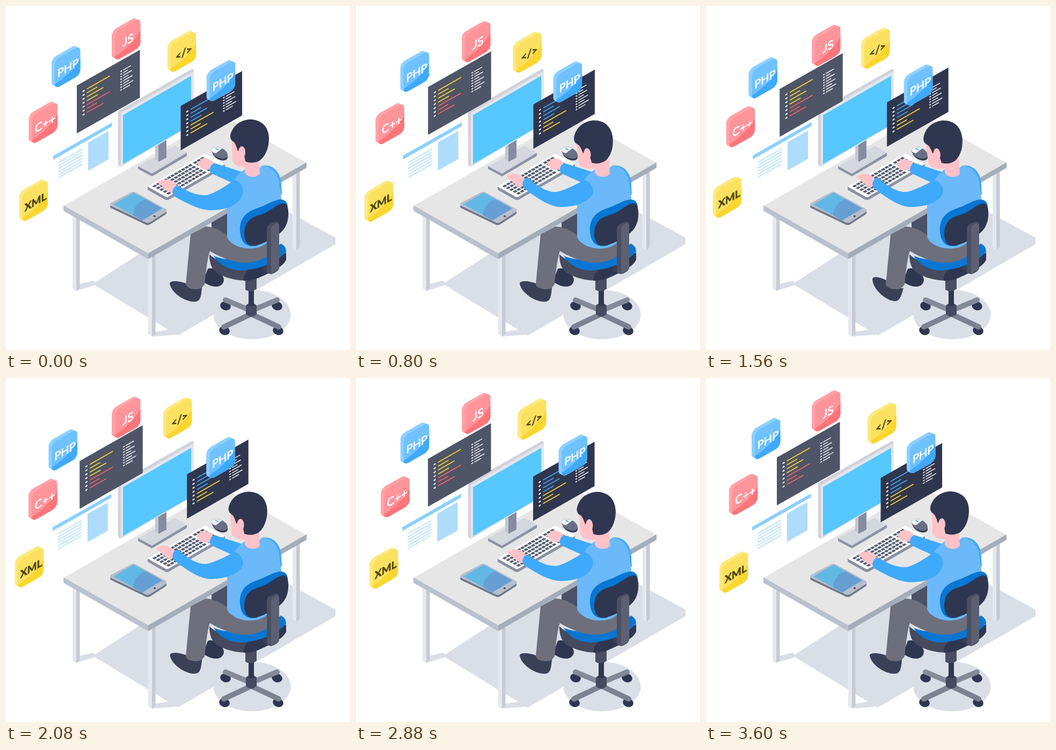
An HTML page with a canvas that plays this animation: 641 px wide and 640 px high, repeating every 3640 ms.

```html
<!DOCTYPE html>
<html lang="en">
<head>
<meta charset="utf-8">
<title>Programmer at a desk</title>
<style>
html, body { margin: 0; width: 100%; height: 100%; overflow: hidden; background: #fff; }
canvas { display: block; width: 641px; height: 640px; }
</style>
</head>
<body>
<canvas id="stage" width="641" height="640"></canvas>
<script>
const ctx = document.getElementById('stage').getContext('2d');
const LOOP = 3640, STEP = 40, SLOPE = -0.567;
const NAVY = '#2f3650', SKIN = '#ffc2c8', SLEEVE = '#3fa9fb', SHADOW = '#dadee7';

// ---- motion ----
const angle = t => 2 * Math.PI * t / LOOP;
const wave = (t, cycles = 1) => (1 - Math.cos(angle(t) * cycles)) / 2;

// Position on an ellipse; dir is 1 for clockwise, -1 for the other way
function orbit(t, cx, cy, rx, ry, phase, dir) {
  const a = angle(t) + phase;
  return [cx + rx * Math.cos(a), cy + dir * ry * Math.sin(a)];
}

function ease(t, from, to) {
  const u = Math.min(1, Math.max(0, (t - from) / (to - from)));
  return u * u * (3 - 2 * u);
}
// Rises from a to b, rests, then falls from c to d
const pulse = (t, a, b, c, d) => ease(t, a, b) - ease(t, c, d);

// ---- drawing helpers ----
function shape(d, color) {
  ctx.fillStyle = color;
  ctx.fill(new Path2D(d));
}
function poly(color, ...p) {
  shape('M' + p.join(' ') + 'Z', color);
}
function line(color, width, x1, y1, x2, y2, cap = 'butt') {
  ctx.strokeStyle = color;
  ctx.lineWidth = width;
  ctx.lineCap = cap;
  ctx.beginPath();
  ctx.moveTo(x1, y1);
  ctx.lineTo(x2, y2);
  ctx.stroke();
}
function oval(color, x, y, rx, ry, turn = 0) {
  ctx.fillStyle = color;
  ctx.beginPath();
  ctx.ellipse(x, y, rx, ry, turn, 0, 7);
  ctx.fill();
}
function box(color, x, y, w, h, r = 0) {
  ctx.fillStyle = color;
  ctx.beginPath();
  ctx.roundRect(x, y, w, h, r);
  ctx.fill();
}
function at(x, y, draw) {
  ctx.save();
  ctx.translate(x, y);
  draw();
  ctx.restore();
}
function wall(x, y, draw) {
  at(x, y, () => { ctx.transform(1, SLOPE, 0, 1, 0, 0); draw(); });
}
function turned(x, y, a, draw) {
  at(x, y, () => { ctx.rotate(a); ctx.translate(-x, -y); draw(); });
}

// ---- floating parts ----
const RED = { side: '#ffa3a8', light: '#ff949a', deep: '#ff757b', ink: '#fff', font: '21px' };
const BLUE = { side: '#8bd0ff', light: '#6fc1ff', deep: '#3fa9fb', ink: '#fff', font: '20px' };
const YELLOW = { side: '#fde97c', light: '#fce160', deep: '#fad62f', ink: '#50470f', font: 'bold 19px' };

function tile(label, look, [x, y]) {
  for (let k = 0; k <= 6; k++)
    wall(x + k, y + 24.5 + k / 2, () => box(look.side, 0, 0, 47, 54, 9));
  wall(x + 6, y + 27.5, () => {
    box(look.light, 0, 0, 47.5, 54, 9);
    ctx.clip();
    shape('M0 45Q30 43 48 24V54H0Z', look.deep);
    ctx.fillStyle = ctx.strokeStyle = look.ink;
    ctx.font = look.font + ' Lato, "Open Sans", sans-serif';
    ctx.textAlign = 'center';
    ctx.lineWidth = 0.7;
    ctx.fillText(label, 24.5, 35.5);
    ctx.strokeText(label, 24.5, 35.5);
  });
}

function codePanel(x, y, w, h, color, first, second) {
  wall(x, y, () => {
    box(color, 0, 0, w, h);
    const left = w * 0.09, right = w * 0.69;
    for (let i = 0; i < 7; i++) {
      const row = 17 + i * 7.3, long = (i % 2 ? 20 : 37) + 6 * Math.cos(i * 1.6);
      box('#fff', left, row - 1.2, 4, 2.6, 1);
      line(i < 4 ? first : second, 2, left + 8, row, left + 8 + long, row);
    }
    for (let i = 0; i < 8; i++) {
      const row = 20 + i * 5, long = (i % 2 ? 8 : 15) + i * 0.7;
      box('#fff', right, row - 1, 3, 2);
      line('#fff', 1.6, right + 5, row, right + 5 + long, row);
    }
  });
}

function page(t) {
  const drift = 2 * t / LOOP;
  wall(88 - drift, 279 - drift, () => {
    box('#8bcffd', 0, 0, 109.5, 7);
    for (let i = 0; i < 6; i++) line('#a5dbff', 1.6, 10, 18 + i * 5.6, 54, 18 + i * 5.6);
    box('#addcfd', 65, 12, 38, 52.5);
  });
}

// ---- furniture ----
function leg(x, top, bottom) {
  poly('#e6e8ee', x, top, x + 7, top, x + 7, bottom, x, bottom - 4);
  poly('#c5cad5', x + 7, top, x + 13.5, top, x + 13.5, bottom - 5, x + 7, bottom);
}

function floorAndDesk() {
  poly(SHADOW, 162, 517, 320, 613, 614, 443, 614, 431, 455, 345, 264, 451);
  poly(SHADOW, 137, 517, 162, 511, 170, 518, 131, 530);
  poly(SHADOW, 278, 606, 310, 601, 322, 611, 272, 615);
  oval(SHADOW, 458.5, 574, 72, 46);
  leg(124, 380, 530);
  leg(534, 300, 453);
  leg(265, 455, 615);
  poly('#e6e6e6', 107, 372, 265, 461, 560, 292, 402, 203);
  poly('#bac1cd', 107, 371, 265, 460, 265, 471, 107, 381);
  poly('#a5adba', 265, 460, 560, 291, 560, 301, 265, 471);
}

function monitor() {
  poly('#8d92a5', 246, 298, 337, 273, 337, 279, 272, 317, 246, 303);
  poly('#d5d7df', 246, 298, 314, 260, 337, 273, 272, 312);
  poly('#c3c7d3', 278, 258, 286, 258, 286, 290, 278, 285);
  poly('#868ca0', 284, 258, 299, 248, 299, 282, 284, 290);
  shape('M209 198Q209 195 212 194L345 118Q350 116 350 121V219L216 298Q209 299 209 294Z', '#cfd2da');
  poly('#e4e5eb', 214, 199, 350, 121, 350, 220, 214, 298);
  poly('#56c7ff', 218, 203, 345, 130, 345, 221, 218, 294);
}

function keyboard() {
  shape('M264 336L408 294V300L304 360Q300 362 296 360L264 342Z', '#8b90a3');
  shape('M264 336L368 276Q371 274 374 276L408 294L304 354Q300 357 296 354Z', '#fff');
  ctx.save();
  ctx.transform(105, -61, 38, 20, 264, 336);
  for (let row = 0; row < 5; row++)
    for (let col = 0; col < 14; col++)
      box('#555c70', 0.045 + col * 0.063 + (col > 10 ? 0.025 : 0), 0.1 + row * 0.17, 0.05, 0.11);
  ctx.restore();
}

function mouse() {
  oval('#353c52', 399, 277, 15, 9, 0.45);
  oval('#697084', 398, 273, 16, 9.5, 0.45);
  shape('M383 268C384 261 395 261 403 265L391 274C386 273 383 271 383 268Z', '#f1f3f8');
  line('#4cb8f5', 2, 391, 265, 395, 267, 'round');
}

function tablet() {
  const body = 'M196 366L232 347Q237 344 242 347L297 377Q302 380 297 384L269 402Q264 405 259 402L196 372Q192 369 196 366Z';
  at(0, 4, () => shape(body, '#6f768a'));
  shape(body, '#b9becb');
  ctx.save();
  ctx.clip(new Path2D('M200 369L238 347L291 376.5L254 399Z'));
  box('#62b8e4', 194, 340, 110, 70);
  oval('#659fd4', 270, 389, 33, 31);
  ctx.restore();
  oval('#3a4156', 277, 391, 2.2, 1.5);
}

function chairBase() {
  const hub = 457, middle = 570;
  for (const side of [-1, 1]) {
    oval(NAVY, hub + side * 48, 558, 10, 8, 0.3);
    oval(NAVY, hub + side * 50, 604, 10, 8, 0.3);
    line('#858a99', 10, hub, middle - 3, hub + side * 48, 547, 'round');
    line('#7d8291', 10, hub, middle + 3, hub + side * 51, 597, 'round');
  }
  shape('M447 557Q457 548 467 557V573Q457 583 447 573Z', '#454b60');
  box(NAVY, 452, 520, 10, 38);
  shape('M446 500H467V526Q457 534 446 528Z', '#4a4e61');
}

function seat() {
  shape('M379 462C400 482 450 494 517 458L522 462V472C516 486 490 497 470 506C450 514 424 511 404 502C386 495 379 484 379 462Z', '#454a5e');
  shape('M443 511C443 492 455 488 470 485C490 480 510 470 522 458V472C516 486 490 497 470 506Q456 512 443 511Z', NAVY);
  shape('M387 465C420 478 470 474 512 442Q522 446 522 457C500 481 470 489 440 492C416 492 398 482 387 465Z', '#0876d2');
}

function backrest() {
  shape('M436 418C435 397 446 384 466 377C486 371 496 361 512 360C520 360 525 366 525 374L468 446C448 450 437 440 436 418Z', '#0876d2');
  shape('M444 424C444 405 453 394 472 389C492 384 502 369 517 367C525 367 527 380 526 390C525 410 515 422 497 432C483 440 470 446 460 446C449 446 444 436 444 424Z', NAVY);
  poly('#3b4056', 478, 487, 490, 480, 490, 498, 478, 491);
  shape('M486 416Q486 408 493 405L500 402Q509 399 509 408V488Q507 495 494 499L486 496Z', '#4b4f62');
  shape('M494 415Q494 409 500 406Q508 402 509 408V489L494 498Z', '#5d6072');
}

// ---- person ----
function feet(t) {
  poly('#4b5266', 383, 403, 412, 386, 412, 430, 383, 418);
  shape('M376 489C390 484 406 500 406 510C404 524 388 527 367 513Z', NAVY);
  const lift = pulse(t, 1160, 1520, 1720, 2160);
  turned(358, 540, 0.18 * lift, () =>
    shape('M305 516C307 510 322 511 338 517C344 526 360 526 365 523C364 536 363 546 357 549C343 555 308 537 305 516Z', '#3a4156'));
}

function trousers() {
  shape('M344 425L372 410Q392 411 413 427L440 445L491 440V462C470 480 440 480 420 474Q398 467 380 456Q375 468 370 518Q364 528 352 527Q338 526 335 518Z', '#6d6f7c');
}

function head(t) {
  const nod = pulse(t, 0, 960, 1640, 2300) + pulse(t, 2600, 3160, 3240, 3600);
  shape('M446 284H471L473 312C467 321 449 319 445 310Z', SKIN);
  at(-6 * nod, nod, () => turned(460, 300, -0.12 * nod, () => {
    shape('M421 249L445 240L468 289L456 299C444 302 423 299 422 287Z', SKIN);
    shape('M418 240C424 218 442 211 457 211C480 213 490 228 490 247C490 262 484 280 472 288C462 293 452 292 446 289L441 262L432 270C429 260 427 254 423 252Q417 248 418 240Z', NAVY);
    oval(SKIN, 439.5, 272, 6.5, 11);
  }));
}

function leftArm(raise) {
  const wrist = -15 * raise, elbow = -6 * raise;
  at(-3 * raise, -11 * raise, () =>
    shape('M311 349Q298 344 291 335L284 330C283 325 287 325 290 326Q292 321 298 323Q312 323 319 335Z', SKIN));
  shape(`M310 ${346 + wrist}Q313 ${332 + wrist} 322 ${335 + wrist}
    Q350 ${353 + elbow} 373 ${352 + elbow}Q390 ${349 + elbow} 425 324
    C437 326 444 338 441 349C437 ${365 + elbow} 420 ${380 + elbow} 380 ${380 + elbow}
    Q355 ${379 + elbow} 312 ${353 + wrist}Z`, SLEEVE);
}

function rightArm(tap) {
  at(-2.5 * tap, 3 * tap, () =>
    shape('M381 304Q364 306 361 299L357 294C355 289 360 290 363 291C359 285 366 283 371 283Q382 284 388 293Z', SKIN));
  shape('M380 303C381 296 386 292 391 293L450 312L430 333L384 312Q379 309 380 303Z', SLEEVE);
}

function person(t) {
  rightArm(wave(t, 4));
  shape('M477 297C498 293 513 311 513 333L514 352L490 330Z', SLEEVE);
  shape('M412 430V357L425 324Q433 312 446 303C458 313 471 303 477 297Q497 296 508 322L514 365L487 440C470 456 439 453 424 443Q414 437 412 430Z', '#6bb9f9');
  head(t);
  leftArm(pulse(t, 240, 640, 2600, 3080));
}

function render(t) {
  const s = wave(t);
  ctx.fillStyle = '#fff';
  ctx.fillRect(0, 0, 641, 640);
  floorAndDesk();
  page(t);
  monitor();
  codePanel(132 + 5.5 * s, 148 + 6.8 * s, 117.5, 89, '#4d5567', '#fbd52f', '#ff5f66');
  codePanel(325.5 + 12.3 * s, 186 - 7 * s, 114.5, 82.5, '#30364e', '#3fa9fb', '#fbd52f');
  keyboard();
  mouse();
  tablet();
  tile('JS', RED, [197, 21.5 + 12.5 * s]);
  tile('PHP', BLUE, [85 - 6 * s, 73 + 22 * s]);
  tile('</>', YELLOW, orbit(t, 295.6, 40.5, 6.7, 6.5, 0.7, 1));
  tile('XML', YELLOW, orbit(t, 19.3, 317.7, 6.8, 6.5, 0.7, 1));
  tile('C++', RED, orbit(t, 41, 181.3, 5.2, 4.7, 1.3, -1));
  tile('PHP', BLUE, orbit(t, 372.3, 103.7, 5.2, 4.7, 1.3, -1));
  chairBase();
  feet(t);
  seat();
  trousers();
  person(t);
  backrest();
}

const start = performance.now();
function frame() {
  const t = (performance.now() - start) % LOOP;
  render(Math.floor(t / STEP) * STEP);
  requestAnimationFrame(frame);
}
frame();
</script>
</body>
</html>
```
